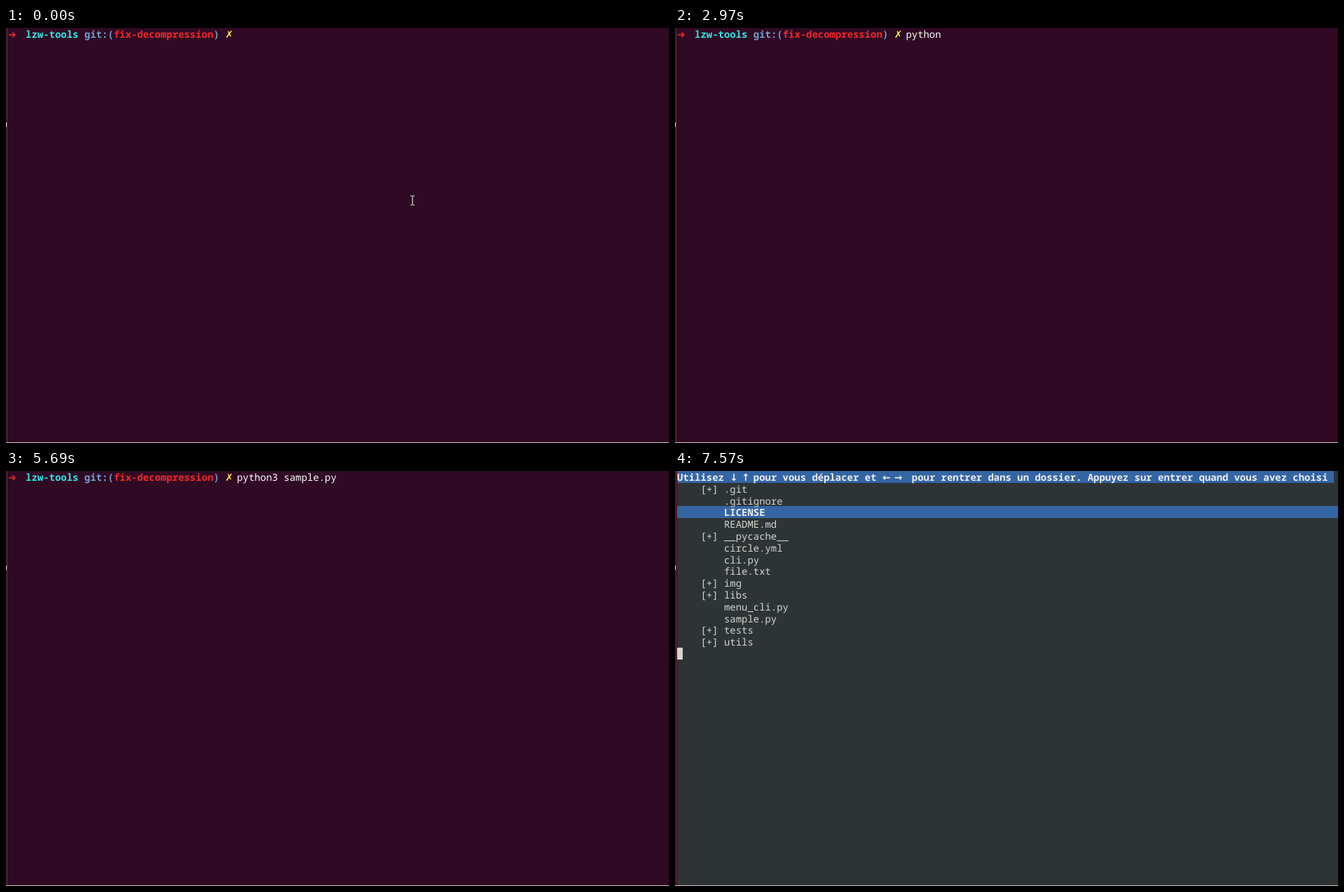
An HTML page that plays this animation: 946x592 px, repeating every 8000 ms.

```html
<!DOCTYPE html>
<html lang="fr">
<head>
<meta charset="utf-8">
<title>LZW tools</title>
<style>
  html, body { margin: 0; width: 100%; height: 100%; overflow: hidden; background: #300a24; }
  svg { display: block; width: 946px; height: 592px; }
  text {
    font: 13.95px "Noto Sans Mono", "DejaVu Sans Mono", monospace;
    font-variant-ligatures: none;
    text-rendering: geometricPrecision;
    white-space: pre;
  }
  .bold { font-weight: 700; }
  .symbol { font-family: "DejaVu Sans", sans-serif; }
</style>
</head>
<body>
<svg id="stage" viewBox="0 0 946 592"></svg>
<script>
const LOOP = 8000, LEFT = 3, CELL = 8.37, LINE = 16.8, BASELINE = 13.9;
const FG = "#d3d7cf", BG = "#2e3436", RED = "#cc0000", BLUE = "#3465a4", BRIGHT = "#eeeeec";
const stage = document.getElementById("stage");
const colX = col => LEFT + col * CELL;

function add(parent, tag, attrs) {
  const el = document.createElementNS("http://www.w3.org/2000/svg", tag);
  for (const key in attrs) el.setAttribute(key, attrs[key]);
  return parent.appendChild(el);
}
const box = (parent, x, y, width, height, fill) =>
  add(parent, "rect", { x, y, width, height, fill });

function put(parent, col, row, string, fill, style = "") {
  const el = add(parent, "text", { x: colX(col), y: row * LINE + BASELINE, fill, class: style });
  el.textContent = string;
  return el;
}
function cells(parent, col, row, count, fill) {
  const x = Math.round(colX(col)), y = Math.round(row * LINE);
  return box(parent, x, y, Math.round(colX(col + count)) - x, Math.round((row + 1) * LINE) - y, fill);
}
const show = (el, on) => el.setAttribute("visibility", on ? "inherit" : "hidden");

// Window frame
box(stage, 0, 0, 946, 592, "#300a24");
box(stage, 1, 0, 1, 591, "#762c2f");
box(stage, 0, 135, 1, 6, "#e6e2e4");

// Shell prompt
const shell = add(stage, "g");
put(shell, 0, 0, "➜", "#ef2929", "bold symbol");
put(shell, 3, 0, "lzw-tools", "#34e2e2", "bold");
put(shell, 13, 0, "git:(", "#729fcf", "bold");
put(shell, 18, 0, "fix-decompression", "#ef2929", "bold");
put(shell, 35, 0, ")", "#729fcf", "bold");
put(shell, 37, 0, "✗", "#fce94f", "bold symbol");
const command = put(shell, 39, 0, "", "#ffffff");
const shellCursor = cells(shell, 39, 0, 1, "#ffffff");
const pointer = add(shell, "path", {
  d: "M577 239.5h2.5M580.5 239.5h2.5M577 252.5h2.5M580.5 252.5h2.5M580 240v12",
  stroke: "#e4e8e0", "stroke-width": 1.2, fill: "none"
});

// Menu
const menu = add(stage, "g");
box(menu, LEFT, 0, 943, 591, BG);
add(menu, "rect", { x: 48.5, y: 59, width: 652.7, height: 301, fill: "none", stroke: FG, "stroke-width": 2 });
put(menu, 6, 4, "LZW tools - Quelle sera votre voie ?", RED);
put(menu, 6, 6, "Choisissez", FG);
put(menu, 17, 6, "↓", FG, "symbol");
put(menu, 19, 6, "↑", FG, "symbol");
put(menu, 21, 6, ":", FG);
cells(menu, 6, 7, 17, RED);
["Compression", "Décompression", "Quitter"].forEach((label, i) =>
  put(menu, 9, 7 + i, `${i + 1}. ${label}`, i ? FG : BG));
const menuCursor = cells(menu, 19, 9, 1, FG);

// File browser
const browser = add(stage, "g");
box(browser, LEFT, 0, 943, 591, BG);
cells(browser, 0, 0, 112, BLUE);
[[0, "Utilisez"], [9, "↓"], [11, "↑"], [13, "pour vous déplacer et"], [35, "←"], [37, "→"],
 [40, "pour rentrer dans un dossier. Appuyez sur entrer quand vous avez choisi"]
].forEach(([col, string]) =>
  put(browser, col, 0, string, BRIGHT, string.length > 1 ? "bold" : "bold symbol"));
cells(browser, 0, 3, 113, BLUE);
const files = [".git/", ".gitignore", "LICENSE", "README.md", "__pycache__/", "circle.yml", "cli.py",
  "file.txt", "img/", "libs/", "menu_cli.py", "sample.py", "tests/", "utils/"];
files.forEach((file, i) => {
  const selected = file === "LICENSE";
  if (file.endsWith("/")) put(browser, 4, i + 1, "[+]", FG);
  put(browser, 8, i + 1, file.replace("/", ""), selected ? BRIGHT : FG, selected ? "bold" : "");
});
cells(browser, 0, 15, 1, FG);

box(stage, 0, 591, 946, 1, "#cfc8cc");

// [time, typed characters, cursor shown]
const typing = [
  [0, 0, 0], [150, 0, 1], [1300, 1, 1], [1590, 2, 1], [1860, 4, 1], [2130, 5, 1], [2410, 6, 1],
  [2970, 6, 0], [3220, 7, 1], [3340, 8, 1], [3500, 9, 1], [3640, 10, 1], [3920, 11, 1], [4170, 12, 1],
  [4420, 13, 1], [4730, 14, 1], [4880, 15, 1], [5160, 18, 1], [5690, 18, 0]
];

function render(t) {
  const [, count, cursorOn] = typing.findLast(step => step[0] <= t);
  command.textContent = "python3 sample.py ".slice(0, count);
  const x = Math.round(colX(39 + count));
  shellCursor.setAttribute("x", x);
  shellCursor.setAttribute("width", Math.round(colX(40 + count)) - x);
  show(shellCursor, cursorOn);
  show(pointer, t < 1300);
  show(shell, t < 6120);
  show(menu, t >= 6120 && t < 7570);
  show(menuCursor, t < 6650 || t >= 7200);
  show(browser, t >= 7570);
}

const start = performance.now();
function frame() {
  render((performance.now() - start) % LOOP);
  requestAnimationFrame(frame);
}
frame();
</script>
</body>
</html>
```
